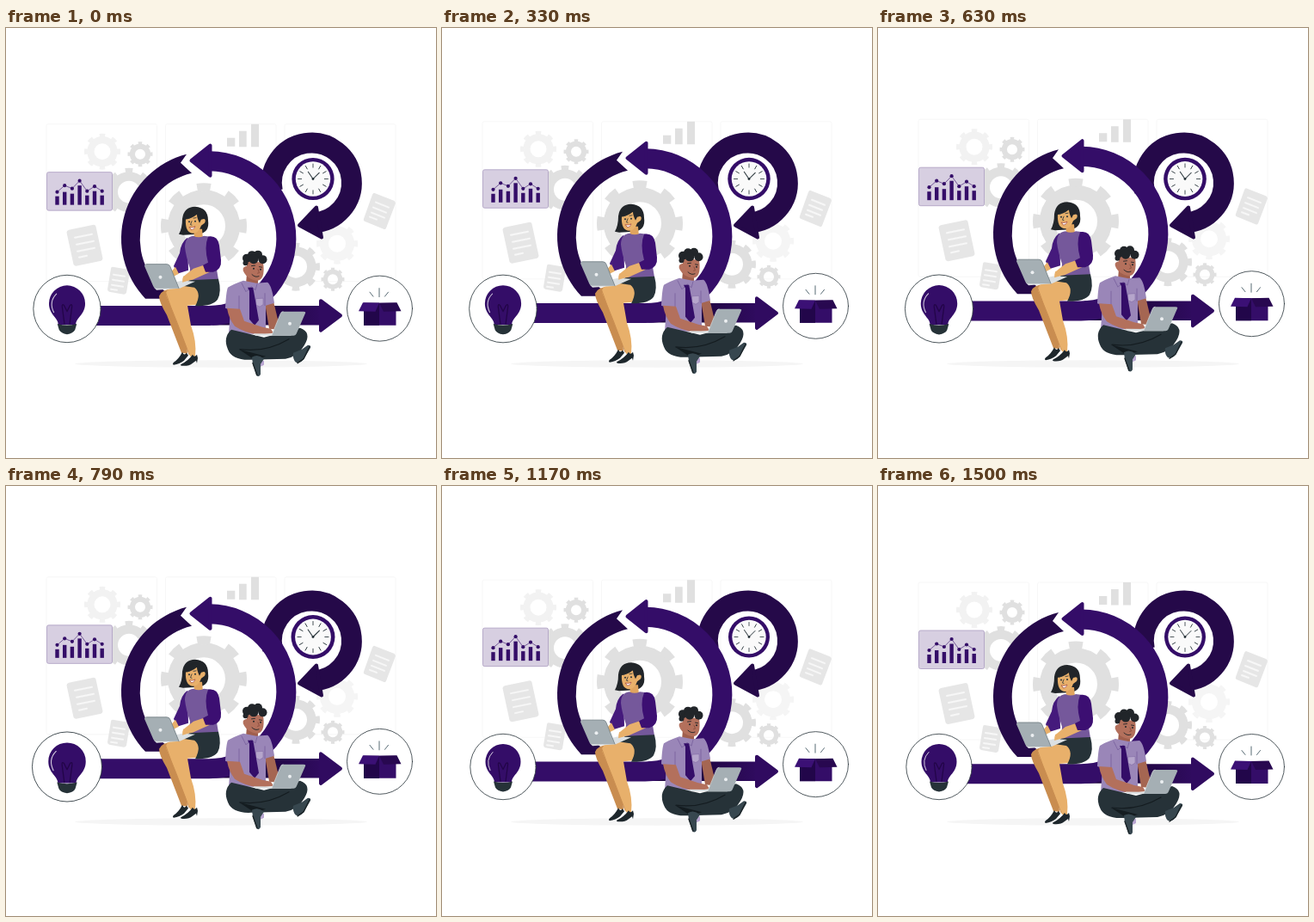
Animation, 500 px wide and 500 px high, one loop 1540 ms. Source, as an HTML page:

```html
<!DOCTYPE html>
<html lang="en">
<head>
<meta charset="utf-8">
<title>Agile loop</title>
<style>
  html, body { margin: 0; height: 100%; overflow: hidden; background: #fff; }
  svg { display: block; width: 100%; height: 100%; }
  path, circle, line, polyline { stroke-linecap: round; stroke-linejoin: round; }
  .flat { stroke-linecap: butt; }
  .line { fill: none; }
</style>
</head>
<body>
<svg viewBox="0 0 500 500">
  <defs>
    <linearGradient id="shaft" gradientUnits="userSpaceOnUse" x1="305" y1="0" x2="385" y2="0">
      <stop stop-color="#210643"/><stop offset="1" stop-color="#340d68"/>
    </linearGradient>
  </defs>

  <ellipse cx="250" cy="390.5" rx="170" ry="4.2" fill="#f5f5f5"/>

  <g class="float">
    <g fill="none" stroke="#f5f5f5" stroke-width=".8">
      <rect x="47" y="112" width="128.500" height="183" rx="2"/>
      <rect x="185.500" y="112" width="128.500" height="183" rx="2"/>
      <rect x="324" y="112" width="129" height="183" rx="2"/>
    </g>
    <g id="gears"></g>
    <path fill="#e0e0e0" d="M257 128h9.300v10h-9.300zM271 120h8.700v18.500h-8.700zM285 112h9v26.500h-9z"/>
    <g fill="#e6e6e6" stroke="#f7f7f7" stroke-width="2">
      <path stroke="none" d="M73 235 102 229q2 0 2.500 2l8 37q0 2-2 3l-29 6q-2 0-3-2l-8-37q0-2 2.500-3zM124 278l18 3q2 1 2 3l-4 24q-1 2-3 2l-17-3q-2-1-2-3l4-24q0-2 2-2zM428 192l23 9q2 1 2 3l-11 29q-1 2-3 1l-22-9q-2-1-1-3l10-28q1-2 2-2z"/>
      <path d="M80 244l20-4M82 252l20-4M83 260l20-4M85 267l9-2M125 287l13 2M124 293l13 2M123 299l13 2M122 304l7 1M430 203l15 6M427 209l15 6M425 215l15 6M423 220l8 3"/>
    </g>
  </g>

  <g fill="#250949" stroke="#250949">
    <path class="line flat" stroke-width="23.800" d="M310 190A46.500 46.500 0 1 1 357 226.500"/>
    <path stroke-width="4" d="M341 229.500 361 208.500 367 243.500z"/>
  </g>

  <g class="beat" data-at="357 175.500">
    <circle r="24" fill="#340d68"/>
    <circle r="19.700" fill="#fafafa"/>
    <g id="ticks" stroke="#263238" stroke-width=".8"></g>
    <path class="line" stroke="#263238" stroke-width="1" d="M-5.500-8 0 0 7-7"/>
    <circle r="1.400" fill="#263238"/>
  </g>

  <g class="float">
    <path class="line flat" stroke="url(#shaft)" stroke-width="22.500" d="M240 334.500H370l.1.100"/>
    <path fill="#300b60" stroke="#300b60" stroke-width="4" d="M366 317.500 389 334.700 366 352z"/>
    <path fill="#250949" d="M210 147 203 157 216 169A78.500 78.500 0 0 0 198 315H162A101.300 101.300 0 0 1 210 147z"/>
    <g fill="#340d68" stroke="#340d68">
      <path class="line flat" stroke-width="23" d="M100 334.800H235A89.900 89.900 0 0 0 237 155"/>
      <path stroke-width="4" d="M215.500 154.500 237.500 137V172z"/>
    </g>
    <g fill="#340d68">
      <rect x="47.500" y="168" width="76" height="44.500" rx="2" fill="#d7cfe1" stroke="#ab9cc0" stroke-width=".8"/>
      <g id="chart"></g>
    </g>
    <circle cx="434.500" cy="326.500" r="38" fill="#fff" stroke="#263238" stroke-width=".8"/>
    <path fill="#340d68" d="M416 320h37.500v26H416z"/>
    <path fill="#22064a" d="M416 320h18v26h-18z"/>
    <path fill="#3b1075" d="M415 319.500 434 320 429.500 330 410 329.500z"/>
    <path fill="#280850" d="M434 320 454.500 319.500 459.500 329.500 439 330z"/>
    <path stroke="#455a64" stroke-width=".9" d="M423 307.500l4 5M434 303v10M444.500 307.500l-4 5"/>
  </g>

  <g class="beat" data-at="71 326.500">
    <circle r="38.200" fill="#fff" stroke="#263238" stroke-width=".8"/>
    <path fill="#340d68" d="M-10 18C-10 10-20.500 7-20.500-6A20.500 20.500 0 0 1 20.500-6C20.500 7 10 10 10 18z"/>
    <path fill="#263238" d="M-11 17q11 3 22 0l-2 7q-2 4-9 5-7-1-9-5z"/>
    <path class="line" stroke="#220547" stroke-width="1.200" d="M-3 17-5.500-2Q-6-6-3.500-4L0 3 3.500-4Q6-6 5.500-2L3 17"/>
    <path class="line" stroke="#d7cfe1" stroke-width="1" d="M-12-17Q-21-8-15 4"/>
  </g>

  <g class="float">
    <g id="woman">
      <path fill="#212529" d="M201 240Q205 233 205 222 207 208 220 208 235 209 235 224 237 238 224 240L206 241z"/>
      <path fill="#e0a45f" d="M218 234h10l1 12q-6 3-10-1z"/>
      <path fill="#e8b06b" d="M209 222Q212 217 224 217L230 222Q233 223 231 227L227 230Q224 239 217 239 208 238 209 222z"/>
      <path fill="#212529" d="M208 223Q211 213 224 211 233 215 231 222L227 223 225 227Q222 221 222 217 216 222 208 223z"/>
      <g fill="#263238"><circle cx="213" cy="225.500" r="1"/><circle cx="220" cy="225" r="1"/></g>
      <path class="line" stroke="#263238" stroke-width=".8" d="M211 222l3-1M218 221.500l3-.5M216 225l-1.500 4 1.500.5"/>
      <path fill="#fff" stroke="#a13f35" stroke-width=".7" d="M213.500 232q4 1 6.500-1-1 4-4 4z"/>

      <path fill="#451a7c" d="M211 244Q203 250 202 262L195 277 199 286 212 282z"/>
      <path fill="#75589b" d="M218 242q6 3 12 0l8 1q9 3 9 15l-2 23 2 12-34 2 1-15q-5-15-6-25 0-12 10-13z"/>
      <path fill="#c98d50" d="M234 301 197 304Q182 303 178 312 178 319 187 334L204 378 211 379Q210 352 204 330L211 317 238 321z"/>
      <path fill="#e8b06b" d="M238 297 205 300Q185 301 186 311 192 325 198 341L214 382 220 382Q222 365 215 346L211 323 232 321z"/>
      <path class="line" stroke="#c98d50" stroke-width="1" d="M186 309Q191 324 199 343L213 380"/>
      <path fill="#263238" d="M213 293.500 247 292Q251 307 246 316 240 324 220 323.500 228 309 219 302L205 300z"/>
      <path fill="#1e272c" d="M205 377q2 5 5 1l2 3-5 6q-5 4-12 5-2-1 0-3 6-4 10-12zM217 380q2 4 5 0l1 4-1 6-1-3-4 3q-5 4-13 3-2-1 0-2 8-4 13-11z"/>

      <path fill="#e8b06b" d="M197 278l4 8-6 3q-3-1-4-4zM233 275 218 280 209 287Q204 291 206 295L217 293 237 284z"/>
      <path fill="#3c0f72" d="M235 243Q246 241 248 253L250 270Q251 281 241 284L232 284 229 276 235 273Q230 255 235 243z"/>
      <path fill="#dce0e2" d="M172 302 205 294 220 295 202 303 175 305z"/>
      <path fill="#a5afb4" d="M163 275H187q3 0 4 3l10 25H175q-3 0-4-3L161 277q0-2 2-2z"/>
      <path class="line" stroke="#78848a" stroke-width=".9" d="M163 275H187q3 0 4 3l10 25"/>
      <circle cx="179.500" cy="290" r="2" fill="#eceff1"/>
      <path fill="#e8b06b" d="M206 289q5-2 8 0l-2 5-7 2z"/>
    </g>

    <g id="man">
      <path fill="#a05f4d" d="M280 286h13v12q-5 8-14 0z"/>
      <path fill="#b3705c" d="M280 271 299 273Q302 294 291 294 281 292 277 285 273 278 280 277z"/>
      <g fill="#212529">
        <circle cx="280" cy="268" r="5"/><circle cx="286" cy="264.500" r="5"/><circle cx="293" cy="264" r="5"/>
        <circle cx="298.500" cy="269.500" r="5"/><circle cx="288" cy="269" r="5.500"/><circle cx="278.500" cy="273.500" r="3"/>
        <circle cx="288" cy="280" r="1"/><circle cx="296" cy="281" r="1"/>
      </g>
      <path class="line" stroke="#212529" stroke-width=".9" d="M285.500 277l4-.5M294.500 278l3 .5M286 287q4 4 8 2"/>
      <path class="line" stroke="#8b4d3f" stroke-width=".9" d="M293 281l1.500 4-2 .5"/>

      <path fill="#a56652" d="M301 320 311 318 317 343 316 351 306 350z"/>
      <path fill="#9a86b8" d="M276 294 291 297 304 296Q309 299 312 320L302 323 302 356H259L261 328 255 326Q256 306 258 302 262 299 276 294z"/>
      <path class="line" stroke="#775f9c" stroke-width=".8" d="M301 323V309M271 327V312M274 297l5 10 6-6 5 4 2-7"/>
      <path fill="#b5a5cb" stroke="#836ca5" stroke-width=".6" d="M291 315 299 314.500V322l-4 2.500-4-2z"/>
      <path fill="#340d68" d="M281 302h6l1 4 6 34-5 6-6-7 0-33z"/>

      <path fill="#263238" d="M262 351Q252 360 258 374 263 387 285 386L325 385Q340 382 347 369 356 354 342 349L300 360z"/>
      <path class="line" stroke="#141c20" stroke-width="1.200" d="M272 374Q302 378 329 362"/>
      <path fill="#141c20" d="M271 374 302 382 289 386z"/>
      <path fill="#b9a6d1" d="M295 388l5-1v5l-4 2z"/>
      <path fill="#37474f" d="M286 383Q293 379 300 385L296 391 296 403q-2 4-5 1L287 391zM334 378 344 374 351 369q4 0 3 3l-7 12q-4 7-10 5-4-4-3-11z"/>
      <path class="line" stroke="#1b2428" stroke-width="1.400" d="M287 390 292 404M353 371 346 385 339 390"/>

      <path fill="#b3705c" d="M257 326 272 327 277 341 298 348 308 350 311 355 295 357Q278 355 266 347 259 338 257 326z"/>
      <path fill="#dce0e2" d="M288 355.500 330 356 332 358H290z"/>
      <path fill="#a5afb4" d="M322 330H346q3 0 2 2l-10 23q-1 3-4 3H309l10-25q1-3 3-3z"/>
      <path class="line" stroke="#cfd6d9" stroke-width=".8" d="M309 357.500 319 333q1-3 3-3"/>
      <circle cx="330" cy="344" r="2" fill="#eceff1"/>
    </g>
  </g>
</svg>
<script>
const LOOP = 1540, LEAD = 40, RISE = 6.67;
const byId = id => document.getElementById(id);

// x, y, outer radius, hole radius, colour
const gears = [
  [112, 144, 21, 9.5, '#f2f2f2'], [156, 147, 14.500, 6, '#e0e0e0'],
  [143, 191, 28, 13, '#e0e0e0'], [230, 230.500, 50, 25, '#e0e0e0'],
  [337, 278, 28, 13, '#e0e0e0'], [380, 292.500, 13.500, 6, '#e0e0e0'],
  [385, 251, 24, 10, '#f5f5f5']
];
const ring = (x, y, from, to, color, extra = '') =>
  `<circle class="flat" cx="${x}" cy="${y}" r="${(from + to) / 2}" fill="none" stroke="${color}" stroke-width="${to - from}" ${extra}/>`;
byId('gears').innerHTML = gears.map(([x, y, outer, hole, color]) =>
  ring(x, y, hole, outer * .84, color) +
  ring(x, y, outer * .8, outer, color, 'pathLength="8" stroke-dasharray=".44 .56" stroke-dashoffset=".22"')
).join('');

byId('ticks').innerHTML = Array.from({ length: 12 }, (_, i) =>
  `<line y1="-17" y2="-13" transform="rotate(${i * 30})"/>`).join('');

const barTops = [196, 191, 193, 183.500, 195, 190, 195];
const dotTops = [191, 183.500, 187, 178, 190, 184.500, 190];
const barX = i => 59.500 + i * 8.700;
byId('chart').innerHTML =
  `<polyline points="${dotTops.map((y, i) => barX(i) + ',' + y).join(' ')}" fill="none" stroke="#340d68" stroke-width=".6"/>` +
  dotTops.map((y, i) => `<circle cx="${barX(i)}" cy="${y}" r="2.100"/>` +
    `<rect x="${barX(i) - 2.200}" y="${barTops[i]}" width="4.400" height="${206 - barTops[i]}"/>`).join('');

const floats = document.querySelectorAll('.float');
const beats = document.querySelectorAll('.beat');
const ramp = (p, start, peak, end) =>
  Math.max(0, Math.min((p - start) / (peak - start), (end - p) / (end - peak)));

function draw(now) {
  const p = (now + LEAD) % LOOP / LOOP;
  const lift = -RISE * ramp(p, 0, .5, 1);
  const scale = 1 + .1 * (ramp(p, 0, .1, .3) + ramp(p, .4, .5, .6));
  floats.forEach(g => g.setAttribute('transform', `translate(0 ${lift})`));
  beats.forEach(g => g.setAttribute('transform', `translate(${g.dataset.at}) scale(${scale})`));
}

let start;
function tick(now) {
  start ??= now;
  draw(now - start);
  requestAnimationFrame(tick);
}
draw(0);
requestAnimationFrame(tick);
</script>
</body>
</html>
```
